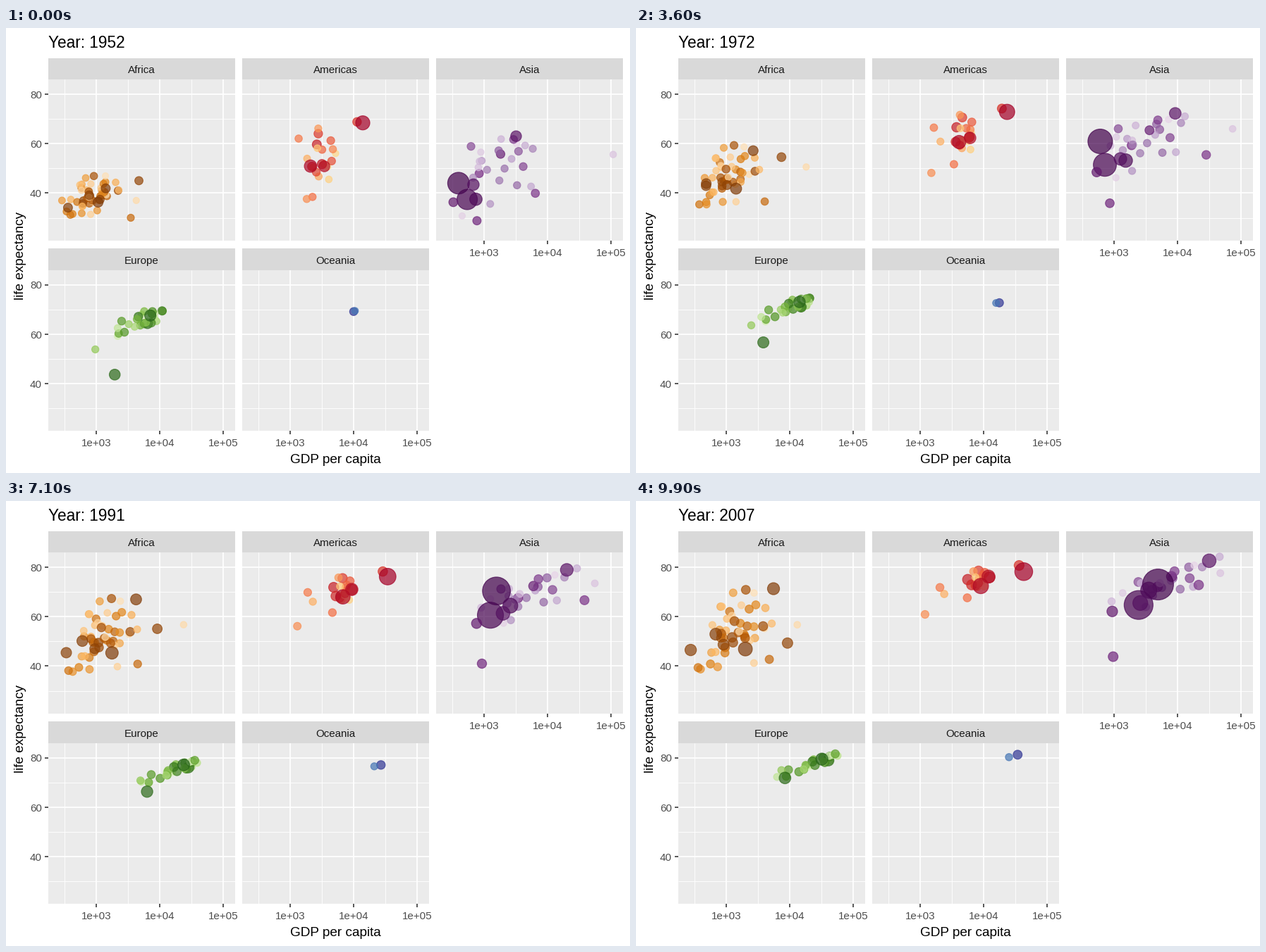
Write a matplotlib script that moves like this. It is 885 by 632 pixels and loops after 10 s.

```python
import numpy as np
import matplotlib.pyplot as plt
from matplotlib.animation import FuncAnimation
from matplotlib.colors import LinearSegmentedColormap
from matplotlib.patches import Rectangle

W, H, DPI = 885, 632, 64
PT = 72 / DPI
FRAMES = 100
FIRST, LAST = 1952, 2007
MID = 25 / 55          # moment of the optional middle point
PANEL_W, PANEL_H, STRIP_H = 265, 228.5, 30.5
LEFTS, TOPS = (60, 335, 610), (73, 343.5)

plt.rcParams["font.family"] = "Liberation Sans"
rng = np.random.default_rng(12)

# Bubbles that stand out: population (millions), start gdp and life,
# end gdp and life, and for bent paths the middle gdp and life.
AFRICA = [
    (12, 3521, 30, 4797, 42.7),
    (65, 781, 39.1, 278, 46.5),
    (80, 1419, 41.9, 5581, 71.3),
    (76, 362, 34.1, 691, 52.9),
    (1.4, 4293, 37, 13206, 56.7, 21746, 52.8),
    (135, 1077, 36.3, 2014, 46.9),
    (44, 4725, 45, 9270, 49.3, 8029, 55.5),
]
AMERICAS = [
    (190, 2109, 50.9, 9066, 72.4),
    (33, 11367, 68.8, 36319, 80.7),
    (8, 1840, 37.6, 1202, 60.9),
    (109, 3478, 50.8, 11978, 76.2),
    (301, 13990, 68.4, 42952, 78.2),
]
ASIA = [
    (32, 779, 28.8, 975, 43.8),
    (1319, 400, 44, 4959, 73, 741, 64),
    (1110, 547, 37.4, 2452, 64.7, 813, 54.2),
    (224, 750, 37.5, 3541, 70.7),
    (127, 3217, 63, 31656, 82.6),
    (2.5, 108382, 55.6, 47307, 77.6),
    (48, 331, 36.3, 944, 62.1),
    (169, 685, 43.4, 2606, 65.5),
    (28, 6460, 39.9, 21655, 72.8, 34168, 58.7),
]
EUROPE = [
    (4.5, 974, 53.8, 7446, 74.9),
    (82, 7144, 67.5, 32170, 79.4),
    (71, 1969, 43.6, 8458, 71.8),
]
OCEANIA = [
    (20, 10040, 69.1, 34435, 81.2),
    (4, 10557, 69.4, 25185, 80.2),
]

# Crowd: count, log gdp and spread, its growth and spread,
# life at start and end, slope over log gdp, noise at start and end.
AFRICA_CROWD = (45, 2.92, .24, .2, .2, 39, 54.5, 6, 4, 8)
AMERICAS_CROWD = (20, 3.46, .17, .38, .16, 53, 73.5, 12, 7, 2.5)
ASIA_CROWD = (24, 3.2, .3, .52, .26, 50, 72, 11, 7, 3)
EUROPE_CROWD = (27, 3.72, .2, .65, .1, 65.5, 77.5, 10, 2, 1)

# name, column, row, bubbles, crowd, population growth, gain in life
# reached at MID, colours from large to small
REGIONS = [
    ("Africa", 0, 0, AFRICA, AFRICA_CROWD, 3.8, .62,
     ("#7f3b08", "#b35806", "#e08214", "#fdb863", "#fee0b6")),
    ("Americas", 1, 0, AMERICAS, AMERICAS_CROWD, 2.1, .55,
     ("#a50026", "#d73027", "#f46d43", "#fdae61", "#fee090")),
    ("Asia", 2, 0, ASIA, ASIA_CROWD, 2.5, .57,
     ("#40004b", "#762a83", "#9970ab", "#c2a5cf", "#e7d4e8")),
    ("Europe", 0, 1, EUROPE, EUROPE_CROWD, 1.35, .56,
     ("#276419", "#4d9221", "#7fbc41", "#b8e186", "#e6f5d0")),
    ("Oceania", 1, 1, OCEANIA, None, 2.2, .38, ("#313695", "#4575b4")),
]


def x_px(left, log_gdp):
    return left + 67.7 + (log_gdp - 3) * 90.15


def y_px(top, life):
    return top + 161.4 - (life - 40) * 3.51


def spread(n):
    return np.clip(rng.normal(size=n), -1.9, 1.9)


def crowd(n, gdp, gdp_sd, rise, rise_sd, life0, life1, slope, noise0, noise1):
    dev, up, luck = spread(n), spread(n), spread(n)
    g0 = gdp + gdp_sd * dev
    g1 = g0 + rise + rise_sd * up
    l0 = life0 + slope * (g0 - gdp) + noise0 * luck
    l1 = life1 + slope * (g1 - gdp - rise) + noise1 * luck
    pop = 8 * np.exp(spread(n))
    return list(zip(pop, 10 ** g0, l0, 10 ** g1, l1))


def make_track(row, share):
    """Start, change and bend of (log gdp, life)."""
    points = np.array(row[1:], float).reshape(-1, 2)
    points[:, 0] = np.log10(points[:, 0])
    start, change = points[0], points[1] - points[0]
    middle = points[2] if len(points) > 2 else start + change * (.56, share)
    bend = (middle - start - change * MID) / (MID * (1 - MID))
    return start, change, bend


def collect():
    tracks, pops, growth, origin, colors = [], [], [], [], []
    for _, col, row, bubbles, rule, ratio, share, stops in REGIONS:
        rows = (crowd(*rule) if rule else []) + bubbles
        cmap = LinearSegmentedColormap.from_list("ramp", stops)
        size = np.array([r[0] for r in rows])
        rank = np.argsort(np.argsort(-size))
        colors.extend(cmap(rank / (len(rows) - 1), alpha=.7))
        tracks += [make_track(r, share) for r in rows]
        pops.extend(size)
        growth += [ratio] * len(rows)
        origin += [(LEFTS[col], TOPS[row])] * len(rows)
    return [np.array(a) for a in (tracks, pops, growth, origin, colors)]


tracks, pops, growth, origin, colors = collect()

fig = plt.figure(figsize=(W / DPI, H / DPI), dpi=DPI, facecolor="white")
ax = fig.add_axes([0, 0, 1, 1])
ax.set(xlim=(0, W), ylim=(H, 0))
ax.axis("off")


def label(x, y, s, px, color="black", ha="center", **kw):
    return ax.text(x, y, s, fontsize=px * PT, color=color, ha=ha,
                   va="baseline", rotation_mode="anchor", **kw)


def line(xs, ys, color, px):
    ax.plot(xs, ys, color=color, lw=px * PT, solid_capstyle="butt", zorder=1)


def box(x, y, w, h, color):
    ax.add_patch(Rectangle((x, y), w, h, fc=color, lw=0, zorder=0))


def grid(left, top, shift, px):
    for k in range(3):
        x = x_px(left, 3 + k - shift / 20)
        y = y_px(top, 40 + 20 * k - shift)
        line((x, x), (top, top + PANEL_H), "white", px)
        line((left, left + PANEL_W), (y, y), "white", px)


def panel(name, col, row):
    left, top = LEFTS[col], TOPS[row]
    bottom = top + PANEL_H
    box(left, top, PANEL_W, PANEL_H, "#ebebeb")
    box(left, top - STRIP_H, PANEL_W, STRIP_H, "#d9d9d9")
    label(left + PANEL_W / 2, top - 8.5, name, 15.1, "#1a1a1a")
    grid(left, top, 10, .9)
    grid(left, top, 0, 1.7)
    if col == 0:
        for life in (40, 60, 80):
            y = y_px(top, life)
            line((left - 5, left), (y, y), "#333333", 1.6)
            label(left - 9, y + 6, str(life), 15.1, "#4d4d4d", "right")
    if row == 1 or col == 2:
        for g in (3, 4, 5):
            x = x_px(left, g)
            line((x, x), (bottom, bottom + 5), "#333333", 1.6)
            label(x, bottom + 22, f"1e+0{g}", 15.1, "#4d4d4d")


for name, col, row, *_ in REGIONS:
    panel(name, col, row)
label(467.5, 618, "GDP per capita", 19)
label(25, 323, "life expectancy", 19, rotation=90)
title = label(60, 28, "", 22.6, ha="left")
dots = ax.scatter(origin[:, 0], origin[:, 1], facecolors=colors,
                  edgecolors=colors, linewidths=1.2 * PT, zorder=3)


def update(i):
    s = i / (FRAMES - 1)
    start, change, bend = tracks.transpose(1, 0, 2)
    log_gdp, life = (start + change * s + bend * s * (1 - s)).T
    pop = pops * growth ** (s - 1)
    size = 2 + 10 * np.sqrt(pop / pops.max())
    diameter = 2 * (size * 1.778 + .6)
    dots.set_offsets(np.column_stack([x_px(origin[:, 0], log_gdp),
                                      y_px(origin[:, 1], life)]))
    dots.set_sizes((diameter * PT) ** 2)
    title.set_text(f"Year: {round(FIRST + (LAST - FIRST) * s)}")
    return dots, title


anim = FuncAnimation(fig, update, frames=FRAMES, interval=100,
                     init_func=lambda: update(0), repeat=True, repeat_delay=0)
plt.show()
```
